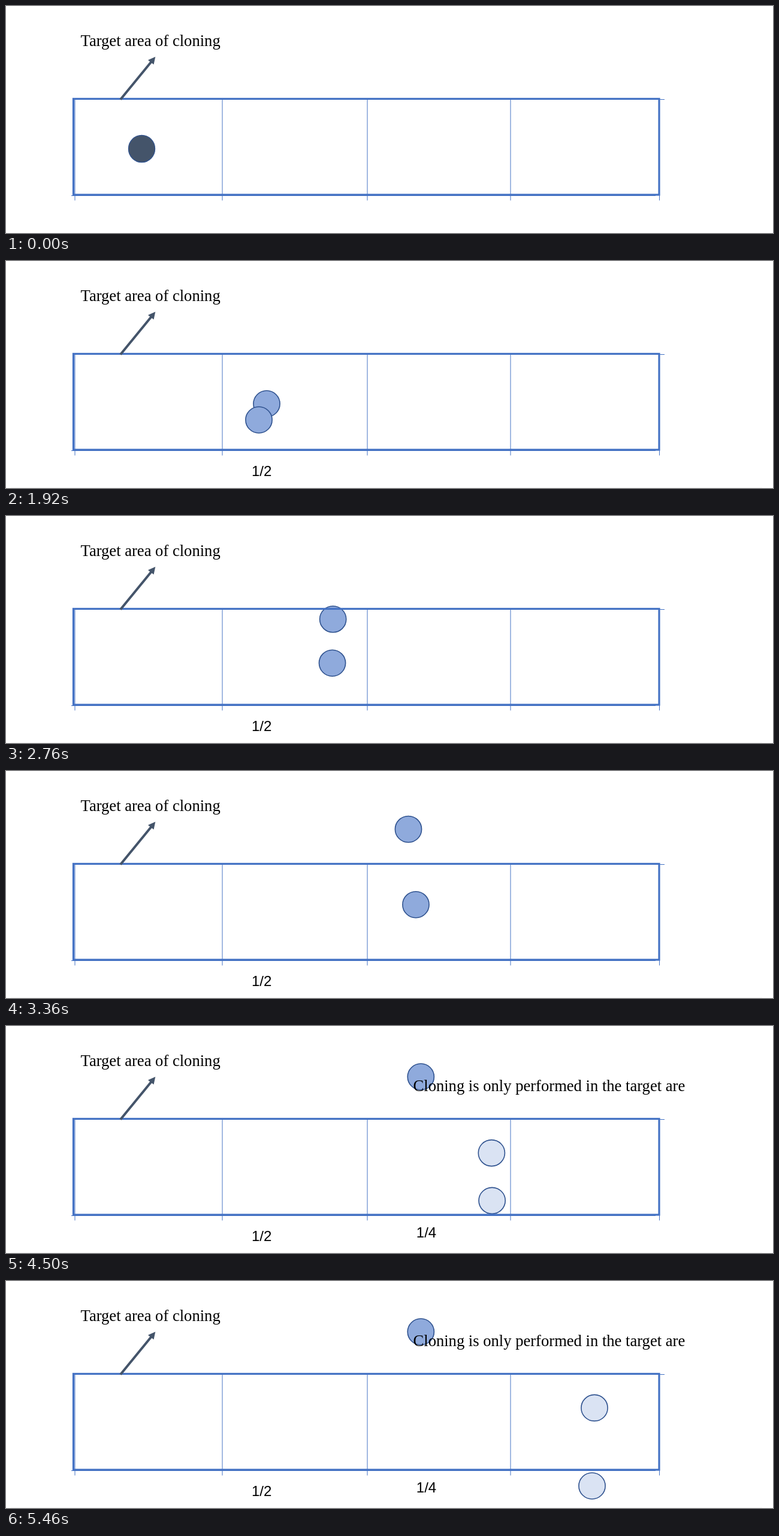
Animation, 1280 px wide and 380 px high, one loop 5.52 s. Source, as an HTML page:

```html
<!DOCTYPE html>
<html lang="en">
<head>
<meta charset="utf-8">
<title>Cloning in the target area</title>
<style>
  html, body { margin: 0; width: 100%; height: 100%; overflow: hidden; background: #fff; }
  svg { display: block; width: 1280px; height: 380px; }
  .serif { font: 26.6px "Liberation Serif", "Times New Roman", serif; }
  .sans { font: 24px "Liberation Sans", Arial, sans-serif; }
  .ball { stroke: #2f528f; stroke-width: 1.6; }
  .dark { fill: #44546a; stroke-width: 1.2; }
  .mid { fill: #8faadc; }
  .light { fill: #dae3f3; }
  .grid { fill: none; stroke: #4472c4; }
</style>
</head>
<body>
<svg viewBox="0 0 1280 380">
  <path id="footer" d="M8 379.5H1262" stroke="#f6f6f6"/>
  <g id="balls"></g>
  <g class="grid">
    <path d="M115 156V325.5M361 156V325.5M603 156V325.5M842 156V325.5M1090.5 316V325.5M1090 156.5H1099M109 317.5H1084"/>
    <rect x="112.5" y="155.4" width="977.5" height="160.6" stroke-width="3.2"/>
  </g>
  <path d="M191 156.5L244 91.5" stroke="#44546a" stroke-width="4"/>
  <path d="M249.3 85L246.5 98L237 90.5Z" fill="#44546a"/>
  <text class="serif" x="124.5" y="67">Target area of cloning</text>
  <text class="sans" id="half" x="410" y="360">1/2</text>
  <g id="final">
    <text class="sans" x="684.8" y="354">1/4</text>
    <text class="serif" x="679.5" y="109">Cloning is only performed in the target are</text>
  </g>
</svg>
<script>
const LOOP = 5520, STEP = 60;
const SPLIT = 1890, SECOND_SPLIT = 3720;

// Each ball glides from one point to another and is visible between show and hide.
const balls = [
  { kind: "dark", from: [226.5, 239], to: [435, 239], start: 70, end: 1870, show: 0, hide: SPLIT },
  { kind: "mid", from: [435, 239], to: [692.3, 85], start: 1930, end: 3720, show: SPLIT, hide: LOOP },
  { kind: "mid", from: [422, 266], to: [707, 220], start: 1930, end: 3720, show: SPLIT, hide: SECOND_SPLIT },
  { kind: "light", from: [695, 212.7], to: [982, 212.4], start: 3720, end: 5460, show: SECOND_SPLIT, hide: LOOP },
  { kind: "light", from: [699, 258.3], to: [978, 343], start: 3720, end: 5460, show: SECOND_SPLIT, hide: LOOP }
];

const byId = id => document.getElementById(id);
const setVisible = (node, on) => node.setAttribute("visibility", on ? "visible" : "hidden");

function ease(u) {
  u = Math.min(1, Math.max(0, u));
  return u < 0.5 ? 2 * u * u : 1 - 2 * (1 - u) ** 2;
}

for (const ball of balls) {
  ball.node = document.createElementNS("http://www.w3.org/2000/svg", "ellipse");
  ball.node.setAttribute("class", "ball " + ball.kind);
  ball.node.setAttribute("rx", 22.1);
  ball.node.setAttribute("ry", ball.kind === "dark" ? 22.6 : 22);
  byId("balls").append(ball.node);
}

function draw(t) {
  for (const { node, from, to, start, end, show, hide } of balls) {
    const p = ease((t - start) / (end - start));
    node.setAttribute("cx", from[0] + (to[0] - from[0]) * p);
    node.setAttribute("cy", from[1] + (to[1] - from[1]) * p);
    setVisible(node, t >= show && t < hide);
  }
  setVisible(byId("half"), t >= SPLIT);
  setVisible(byId("footer"), t >= SPLIT);
  setVisible(byId("final"), t >= SECOND_SPLIT);
}

const origin = performance.now();
function tick() {
  const t = (performance.now() - origin) % LOOP;
  draw(Math.floor(t / STEP) * STEP);
  requestAnimationFrame(tick);
}
tick();
</script>
</body>
</html>
```
